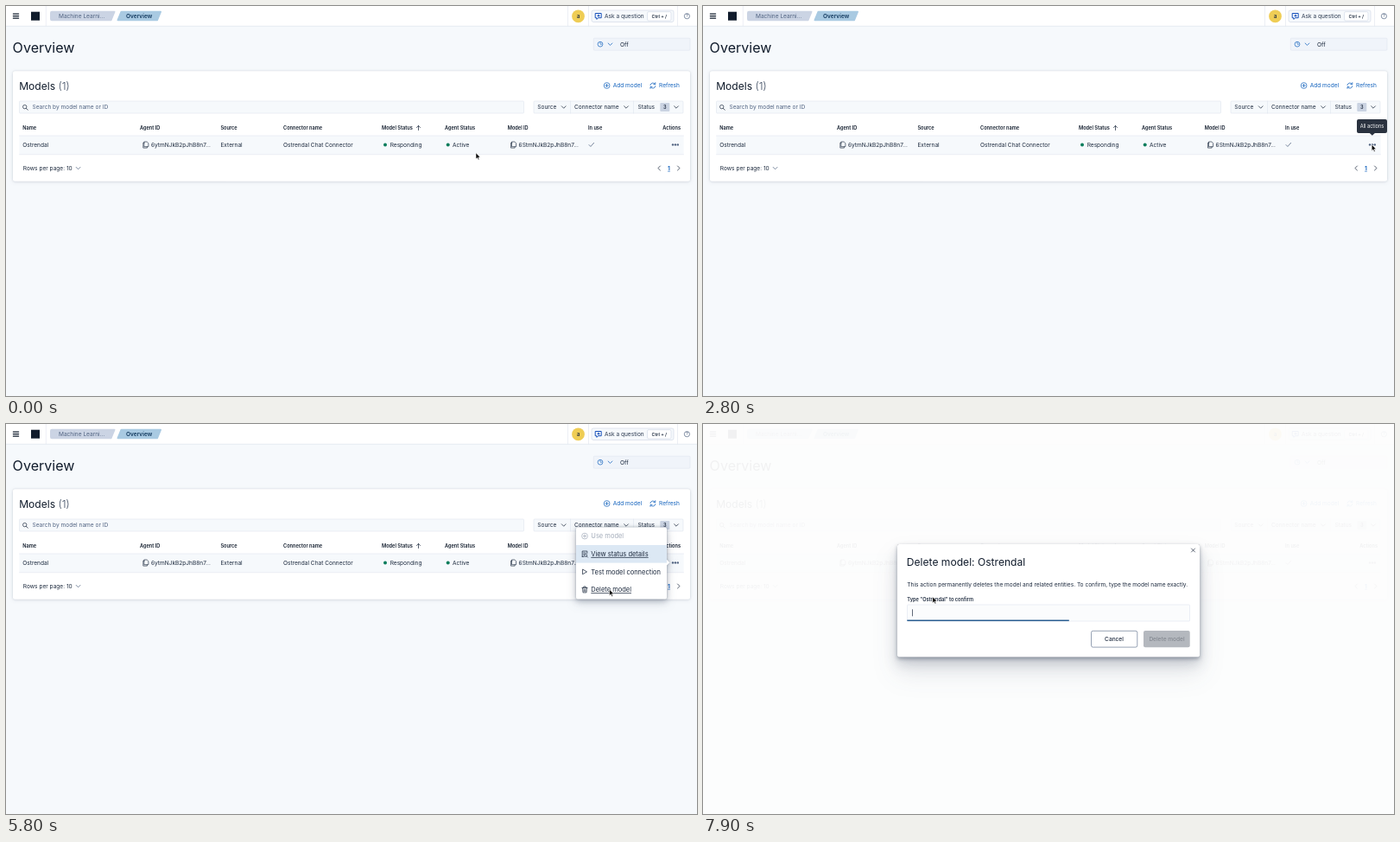
An HTML page that plays this animation: 800x451 px, repeating every 8000 ms.

```html
<!DOCTYPE html>
<html lang="en">
<head>
<meta charset="utf-8">
<title>Models overview</title>
<style>
  html, body { margin: 0; width: 100%; height: 100%; overflow: hidden; background: #f6f9fc; }
  svg { display: block; width: 100vw; height: 100vh; font-family: Inter, sans-serif; font-optical-sizing: none; }
  .card { filter: drop-shadow(0 0 1px #2b394f26) drop-shadow(0 1px 2px #2b394f1c); }
  .float { filter: drop-shadow(0 0 1px #2b394f55) drop-shadow(0 2px 3px #2b394f40) drop-shadow(0 4px 6px #2b394f26); }
  .dialog { filter: drop-shadow(0 0 .7px #2b394f88) drop-shadow(0 2px 2px #2b394f66) drop-shadow(0 7px 7px #2b394f33) drop-shadow(0 16px 14px #2b394f1c); }
</style>
</head>
<body>
<svg id="stage" viewBox="0 0 800 451"></svg>
<script>
const INK = '#1d2a3e', HEAD = '#111c2c', MUTED = '#516381', BLUE = '#1262bd', LINE = '#dfe5ef', FIELD = '#f6f9fc';
const MODEL = 'Ostrendal', LOOP = 8000, STEP = 100;

// Text whose capitals are centred vertically on y.
const text = (x, y, str, { size = 6.57, fill = INK, weight = 400, anchor = 'start', more = '' } = {}) =>
  `<text x="${x}" y="${y + size * .364}" font-size="${size}" fill="${fill}" font-weight="${weight}" text-anchor="${anchor}" ${more}>${str}</text>`;
const rect = (x, y, w, h, fill, { stroke = 'none', r = 0, more = '' } = {}) =>
  `<rect x="${x}" y="${y}" width="${w}" height="${h}" rx="${r}" fill="${fill}" stroke="${stroke}" stroke-width=".6" ${more}/>`;
const line = (d, stroke = INK, width = .75) =>
  `<path d="${d}" fill="none" stroke="${stroke}" stroke-width="${width}" stroke-linecap="round" stroke-linejoin="round"/>`;
const circle = (x, y, r, fill, stroke = 'none') =>
  `<circle cx="${x}" cy="${y}" r="${r}" fill="${fill}" stroke="${stroke}" stroke-width=".7"/>`;
const chevron = (x, y, color = INK) => line(`M${x - 2.4} ${y - 1.2}l2.4 2.4l2.4 -2.4`, color);
const plusIcon = (x, y, color) => circle(x, y, 3.4, 'none', color) + line(`M${x - 1.7} ${y}h3.4M${x} ${y - 1.7}v3.4`, color);
const copyIcon = x => line(`M${x + 1.6} 157h3l1.7 1.7v4h-4.7zM${x + 1.6} 158.2h-1.4v5.9h4.6v-1.2`, INK, .65);
const tab = (d, fill) => `<path d="${d}" fill="${fill}" stroke="${fill}" stroke-width="2" stroke-linejoin="round"/>`;

const topBar = () =>
  rect(0, 0, 800, 23, '#fff') + line('M0 23.3H800', LINE, .7) +
  line('M8.3 9.1h6.4M8.3 11.6h6.4M8.3 14.1h6.4', HEAD, 1.1) +
  rect(29, 6.7, 10, 10, HEAD) +
  line('M46.3 0v23M650.5 0v23M674.5 0v23M777.5 0v23', LINE, .6) +
  tab('M53 6.7H125.5L121.5 16.3H53Q52 16.3 52 15V8Q52 6.7 53 6.7z', '#cbd4e4') +
  text(61, 11.6, 'Machine Learni...', { fill: MUTED }) +
  tab('M133.5 6.7H179L175 16.3H129.5z', '#a9cae2') +
  text(139, 11.6, 'Overview', { fill: '#12395e', weight: 600 }) +
  circle(662.5, 11.8, 7.4, '#efcd55') + text(662.5, 11.3, 'a', { anchor: 'middle', weight: 500 }) +
  rect(678, 5, 95, 13.5, FIELD, { stroke: '#cdd6e4', r: 2 }) +
  line('M682.6 8.5h6.6v5.2h-3.4l-2 1.6v-1.6h-1.2z', '#1750ba', 1) +
  `<path d="M686 9.2l.6 1.4l1.5.6l-1.5.6l-.6 1.4l-.6-1.4l-1.5-.6l1.5-.6z" fill="#1750ba"/>` +
  text(693, 11.7, 'Ask a question', { fill: '#2b394f' }) +
  rect(742.5, 6.7, 27.5, 10.3, '#fff', { stroke: '#cdd6e4', r: 1.5 }) +
  text(756.3, 11.7, 'Ctrl + /', { size: 5.3, weight: 600, anchor: 'middle' }) +
  circle(788.4, 11.7, 3.1, 'none', MUTED) + text(788.4, 11.7, '?', { size: 4.6, anchor: 'middle', fill: MUTED, weight: 600 });

const filters = () =>
  rect(15.5, 110, 584, 14, FIELD, { stroke: LINE, r: 1 }) +
  circle(21.7, 116.6, 2.2, 'none', INK) + line('M23.4 118.4l1.8 1.8') +
  text(30.5, 117, 'Search by model name or ID', { fill: MUTED }) +
  rect(611, 110, 173, 14, FIELD, { stroke: LINE, r: 1 }) + line('M653.5 110v14M726.5 110v14', LINE, .6) +
  text(615.3, 117, 'Source') + chevron(645.7, 117) +
  text(658, 117, 'Connector name') + chevron(718, 117) +
  text(731.5, 117, 'Status') + rect(757.3, 112, 11, 10, '#cad3e2', { r: 1 }) +
  text(762.8, 117, '3', { size: 5.63, weight: 600, anchor: 'middle' }) + chevron(776, 117);

const table = () => {
  const heads = [[19.3, 'Name'], [155, 'Agent ID'], [248.4, 'Source'], [321, 'Connector name'],
    [435, 'Model Status'], [508, 'Agent Status'], [580.7, 'Model ID'], [674, 'In use']];
  const cells = [[19.3, MODEL], [168, '6ytmNJkB2pJhB8n7...'], [248.4, 'External'], [321, MODEL + ' Chat Connector'],
    [444.7, 'Responding'], [517, 'Active'], [593.6, '6StmNJkB2pJhB8n7...']];
  const headStyle = { size: 5.63, weight: 600, fill: HEAD };
  return rect(15.5, 150, 769, 21.7, FIELD) + line('M15.5 150h769M15.5 171.7h769', LINE, .6) +
    heads.map(([x, s]) => text(x, 141, s, headStyle)).join('') +
    text(781, 141, 'Actions', { ...headStyle, anchor: 'end' }) +
    line('M477.5 143.5v-5M475.4 140.5l2.1 -2.1l2.1 2.1') +
    cells.map(([x, s]) => text(x, 160.3, s)).join('') +
    copyIcon(158.6) + copyIcon(584.3) +
    circle(439, 160.4, 2, '#0a7d5c') + circle(511.7, 160.4, 2, '#0a7d5c') +
    line('M675 160.6l1.9 1.9l3.7 -4.2', MUTED) +
    [772, 774.9, 777.8].map(x => circle(x, 160.4, 1.2, MUTED)).join('') +
    text(19.8, 187.5, 'Rows per page: 10') + chevron(83.6, 187.6, MUTED) +
    line('M757.4 185l-2.5 2.5l2.5 2.5M777.5 185l2.5 2.5l-2.5 2.5') +
    text(767.5, 187.4, '1', { anchor: 'middle', fill: BLUE, weight: 700, more: 'text-decoration="underline"' });
};

const page = () => topBar() +
  text(7.6, 48, 'Overview', { size: 16.1, fill: HEAD }) +
  rect(680.3, 37.2, 111.7, 14, '#f0f4fa', { stroke: LINE, r: 1 }) +
  circle(688, 44.2, 2.9, 'none', BLUE) + line('M688 42.2v2h1.7', BLUE, .6) + chevron(699.5, 44.2, BLUE) +
  text(711, 44.2, 'Off') +
  rect(8, 75.3, 784, 127.5, '#fff', { r: 2.5, more: 'class="card"' }) +
  text(15.2, 92.3, 'Models <tspan fill="#3d4b61" font-weight="300">(1)</tspan>', { size: 12.1, fill: HEAD }) +
  plusIcon(695.6, 92, BLUE) + text(702.7, 92, 'Add model', { fill: BLUE }) +
  line('M746 91.5a3 3 0 0 1 5.3 -1.4M751.8 88.6v2h-2M751.8 92.6a3 3 0 0 1 -5.3 1.4M746 95.4v-2h2', BLUE) +
  text(756, 92, 'Refresh', { fill: BLUE }) + filters() + table();

const tooltip = () =>
  rect(757, 131, 35, 16, '#2a323f', { r: 2 }) +
  `<path d="M771.8 147h6l-3 2.8z" fill="#2a323f"/>` +
  text(774.5, 139.2, 'All actions', { size: 5.63, fill: '#fff', anchor: 'middle' });

const menu = () => {
  const item = (y, label, extra) => text(677.3, y, label, { size: 7.5, ...extra });
  return `<path class="float" d="M662 119.4H763Q765 119.4 765 121.4V156.8l3.4 3.4l-3.4 3.4V200.5Q765 202.5 763 202.5H662Q660 202.5 660 200.5V121.4Q660 119.4 662 119.4z" fill="#fff"/>` +
    rect(660, 140, 105, 20.6, '#dce8f4') +
    plusIcon(670, 129.6, '#a4adba') + item(129.6, 'Use model', { fill: '#a4adba' }) +
    line('M667.2 153.4v-6.4h5.6v2.4M668.6 149h2.4M668.6 151h1M667.2 153.4h2') +
    circle(671.2, 151.8, 1.5, 'none', INK) + line('M672.3 153l1.1 1.1') +
    item(150.2, 'View status details', { more: 'text-decoration="underline"' }) +
    line('M667.9 168.2l4.6 2.7l-4.6 2.7z') + item(170.9, 'Test model connection', { more: 'id="test"' }) +
    line('M666.9 189.4h6.2M668.8 189.3v-1.3h2.4v1.3M667.6 189.5l.4 5.4h4l.4-5.4M669.2 191v2.6M670.8 191v2.6') +
    item(191.6, 'Delete model', { more: 'id="delete"' });
};

const modal = () =>
  rect(225, 139, 350, 130.6, '#fff', { r: 2, more: 'class="dialog"' }) +
  line('M565.5 144l4 4M569.5 144l-4 4', INK, .7) +
  text(235.8, 159.8, `Delete model: ${MODEL}`, { size: 12.1, fill: HEAD }) +
  text(236.3, 185.2, 'This action permanently deletes the model and related entities. To confirm, type the model name exactly.') +
  text(236.3, 202.7, `Type "${MODEL}" to confirm`, { size: 5.63, weight: 600, more: 'id="label"' }) +
  rect(236.5, 209, 327, 19, '#fbfcfd', { stroke: LINE, r: 1 }) +
  rect(236.3, 226.5, 327.4, 1.5, '#2b5f92', { more: 'id="underline"' }) +
  rect(242, 214.3, .7, 8, INK, { more: 'id="caret"' }) +
  rect(449.5, 239.3, 53.3, 18.8, '#fff', { stroke: MUTED, r: 2 }) +
  text(476, 248.6, 'Cancel', { weight: 500, anchor: 'middle' }) +
  rect(510, 239, 53.7, 19.3, '#b4b8be', { r: 2 }) +
  text(537, 248.6, 'Delete model', { fill: '#858a92', weight: 500, anchor: 'middle' });

const $ = id => document.getElementById(id);
$('stage').innerHTML = rect(0, 0, 800, 451, FIELD) + page() +
  `<g id="tooltip">${tooltip()}</g><g id="menu">${menu()}</g>` +
  rect(0, 0, 800, 451, '#fdfdfd', { more: 'id="mask"' }) +
  `<g id="modal">${modal()}</g>` +
  `<path id="cursor" d="M0 0V7.2L1.7 5.7L2.8 8.2L4 7.7L2.9 5.2H5.1z" fill="#000" stroke="#fff" stroke-width=".6"/>`;

const ramp = (t, from, to) => Math.min(1, Math.max(0, (t - from) / (to - from)));
const smooth = k => k * k * (3 - 2 * k);
const mix = (a, b, k) => a + (b - a) * k;

// Each move: start, end, target x, target y, downward sag of the path.
const moves = [
  [450, 1200, 771.7, 159.8, 0],
  [1400, 1900, 774.2, 160.2, 0],
  [3800, 4300, 765.7, 159.6, 0],
  [4500, 5300, 698.6, 191.2, 0],
  [6850, 7700, 265.8, 199.8, 52]
];
function cursorAt(t) {
  let x = 544, y = 169.8;
  for (const [from, to, tx, ty, sag] of moves) {
    const k = smooth(ramp(t, from, to));
    x = mix(x, tx, k);
    y = mix(y, ty, k) + sag * 4 * k * (1 - k);
  }
  return [x, y];
}

const set = (id, name, value) => $(id).setAttribute(name, value);

function draw(t) {
  const [x, y] = cursorAt(t);
  set('cursor', 'transform', `translate(${x} ${y})`);
  set('tooltip', 'opacity', t < 3500 ? ramp(t, 2200, 2500) : 0);

  const open = t < 6400 ? ramp(t, 3600, 3850) : 0;
  set('menu', 'opacity', open);
  set('menu', 'transform', `translate(${-4 * (1 - open)} 0)`);
  const hover = (top, bottom) => x < 765 && y >= top && y < bottom ? 'underline' : 'none';
  set('test', 'text-decoration', hover(160.6, 181.2));
  set('delete', 'text-decoration', hover(181.2, 202));

  const shown = ramp(t, 6400, 6600), rise = 1 - (1 - shown) ** 2;
  set('mask', 'opacity', .95 * ramp(t, 6350, 6550));
  set('modal', 'opacity', rise);
  set('modal', 'transform', `translate(0 ${15 * (1 - rise)})`);
  set('label', 'fill', t < 7800 ? BLUE : INK);
  set('underline', 'width', 327.4 * (ramp(t, 6464, 6614) - ramp(t, 7800, 8034)));
  set('caret', 'opacity', t % 1000 >= 500 ? 1 : 0);
}

function tick() {
  const t = performance.now() % LOOP;
  draw(Math.floor(t / STEP) * STEP);
  requestAnimationFrame(tick);
}
tick();
</script>
</body>
</html>
```
